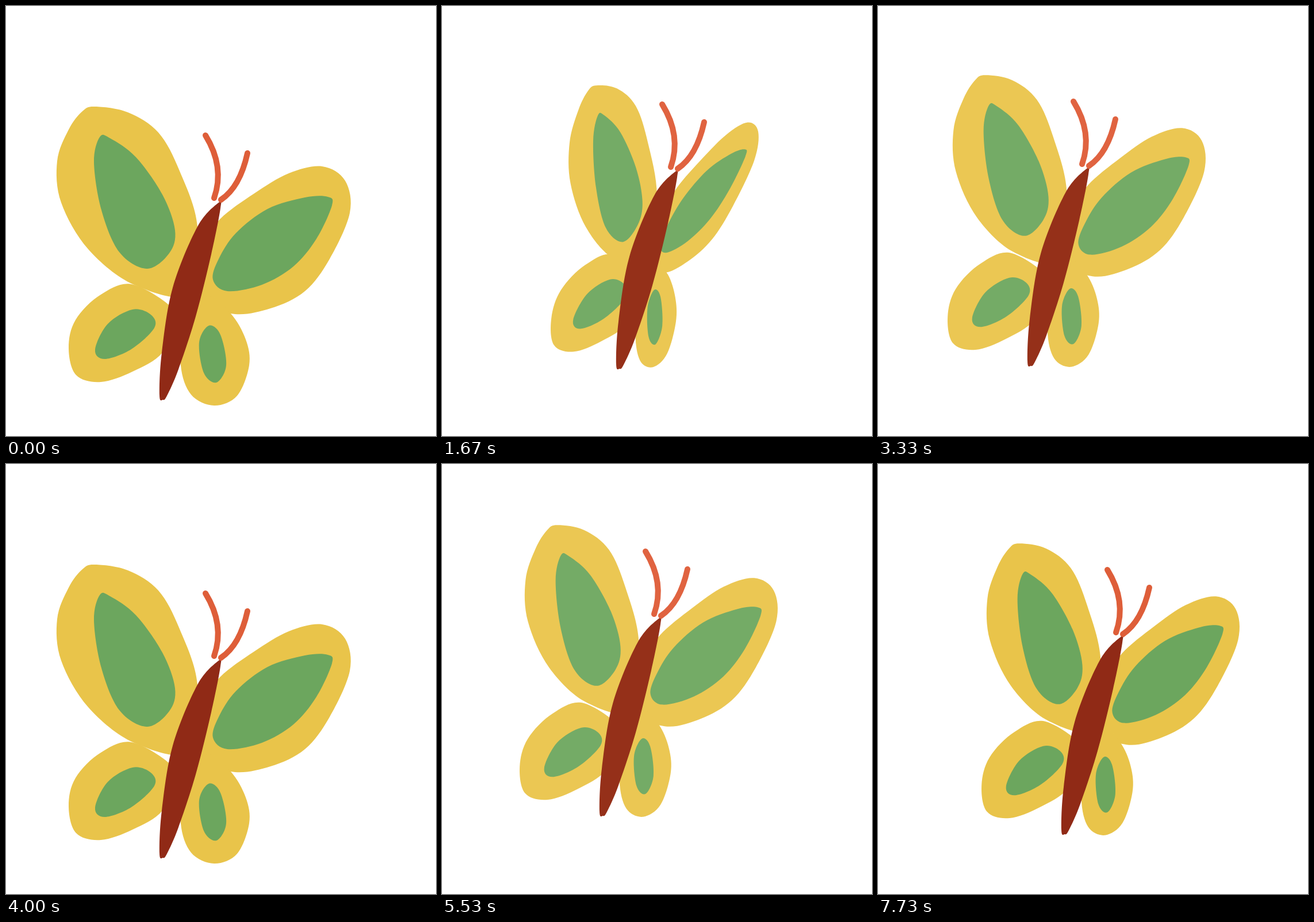
Recreate the animation shown at these times as an HTML page with a canvas. Size 748 by 748 pixels, loop 7870 ms.

```html
<!DOCTYPE html>
<html lang="en">
<head>
<meta charset="utf-8">
<title>Butterfly</title>
<style>
html, body { margin: 0; width: 100%; height: 100%; overflow: hidden; background: #fff; }
canvas { display: block; width: 748px; height: 748px; }
</style>
</head>
<body>
<canvas id="stage" width="748" height="748"></canvas>
<script>
const ctx = document.getElementById('stage').getContext('2d');
const LOOP = 7870;

// Closed smooth curve through a few x,y pairs.
function blob(...xy) {
  const n = xy.length / 2;
  const at = i => { const k = (i + n) % n * 2; return [xy[k], xy[k + 1]]; };
  const path = new Path2D();
  path.moveTo(xy[0], xy[1]);
  for (let i = 0; i < n; i++) {
    const [a, b, c, d] = [at(i - 1), at(i), at(i + 1), at(i + 2)];
    path.bezierCurveTo(
      b[0] + (c[0] - a[0]) / 6, b[1] + (c[1] - a[1]) / 6,
      c[0] - (d[0] - b[0]) / 6, c[1] - (d[1] - b[1]) / 6, c[0], c[1]);
  }
  path.closePath();
  return path;
}

// A wing folds towards its hinge: points move in proportion to their distance
// from it. "tilt" turns the hinge from the vertical, in degrees.
const wings = [
  {
    outer: blob(155,175, 212,185, 265,220, 302,287, 333,384, 320,500, 223,485, 143,423, 96,342, 89,270, 109,215, 133,183),
    spot: blob(163,228, 181,230, 226,263, 272,328, 294,390, 284,430, 245,457, 197,428, 166,355, 153,272),
    hinge: [347, 384], tilt: 6.6, half: [.183, .02], closed: [.36, .08]
  },
  {
    outer: blob(223,485, 165,502, 121,546, 109,595, 122,642, 165,654, 220,636, 272,603, 300,540),
    spot: blob(220,528, 252,537, 258,560, 218,597, 172,614, 155,598, 177,553),
    hinge: [270, 735], tilt: 39, half: [.09, .022], closed: [.212, .01]
  },
  {
    outer: blob(372,371, 432,326, 492,291, 550,279, 590,304, 598,360, 563,440, 520,496, 460,526, 391,535, 325,500, 340,420),
    spot: blob(560,332, 567,347, 540,405, 500,453, 445,485, 385,496, 360,476, 370,440, 400,395, 455,353, 520,333),
    hinge: [372, 371], tilt: 26.5, half: [.12, .065], closed: [.46, .19]
  },
  {
    outer: blob(391,535, 417,580, 423,625, 402,678, 362,695, 322,676, 304,625, 310,550, 350,505),
    spot: blob(353,556, 373,572, 383,625, 366,655, 344,638, 336,585),
    hinge: [296, 620], tilt: 7.5, half: [.255, .11], closed: [.412, .17]
  }
];

const body = blob(370,342, 373,352, 357,432, 330,540, 300,632, 280,678, 273,685, 267,677, 271,603, 290,490, 333,384);
const feelers = new Path2D('M347 225Q381 280 362 334M420 256Q407 315 374 337');

const deep = { wing: '#e9c44a', spot: '#6ca65e', body: '#902a16', feeler: '#de5e39' };
const pale = { wing: '#ebc753', spot: '#74ab66', body: '#953019', feeler: '#e06340' };

// The flight is a triangle of eased legs: corner x, y and the bow of the leg that follows.
const corners = [[0, 0, 0], [-9, -79, -4], [52, -41, 3]];

function flight(step) {
  const phase = (step + 8) % 9 / 3;
  const leg = Math.floor(phase), t = phase - leg;
  const [x0, y0, bow] = corners[leg];
  const [x1, y1] = corners[(leg + 1) % 3];
  const ease = t * t * (3 - 2 * t);
  return [
    Math.round(x0 + (x1 - x0) * ease),
    Math.round(y0 + (y1 - y0) * ease + bow * Math.sin(Math.PI * t))
  ];
}

function fold({ hinge, tilt, half, closed }, pose) {
  const [kx, ky] = [[0, 0], half, closed][pose];
  const nx = Math.cos(tilt * Math.PI / 180), ny = Math.sin(tilt * Math.PI / 180);
  const origin = hinge[0] * nx + hinge[1] * ny;
  ctx.transform(1 - kx * nx, -ky * nx, -kx * ny, 1 - ky * ny, kx * origin, ky * origin);
}

function fill(path, color) {
  ctx.fillStyle = color;
  ctx.fill(path);
}

function drawWings(part, color, pose) {
  for (const wing of wings) {
    ctx.save();
    fold(wing, pose);
    fill(wing[part], color);
    ctx.restore();
  }
}

function draw(step) {
  const pose = [1, 0, 1, 2][step % 4];
  const paint = step % 18 % 5 % 2 ? deep : pale;
  ctx.setTransform(1, 0, 0, 1, 0, 0);
  ctx.fillStyle = '#fff';
  ctx.fillRect(0, 0, 748, 748);
  ctx.translate(...flight(step));
  drawWings('outer', paint.wing, pose);
  drawWings('spot', paint.spot, pose);
  fill(body, paint.body);
  ctx.lineWidth = 10;
  ctx.lineCap = 'round';
  ctx.strokeStyle = paint.feeler;
  ctx.stroke(feelers);
}

// Drawings last 110 ms but appear on a 15 per second grid;
// each 36-step cycle starts one step ahead and waits at step 5.
function stepAt(ms) {
  const tick = Math.floor(ms % LOOP * 0.015 + 0.06);
  const step = Math.floor(tick * 20 / 33) % 36;
  return step < 5 ? step + 1 : step;
}

const start = performance.now();

function frame() {
  draw(stepAt(performance.now() - start));
  requestAnimationFrame(frame);
}

frame();
</script>
</body>
</html>
```
